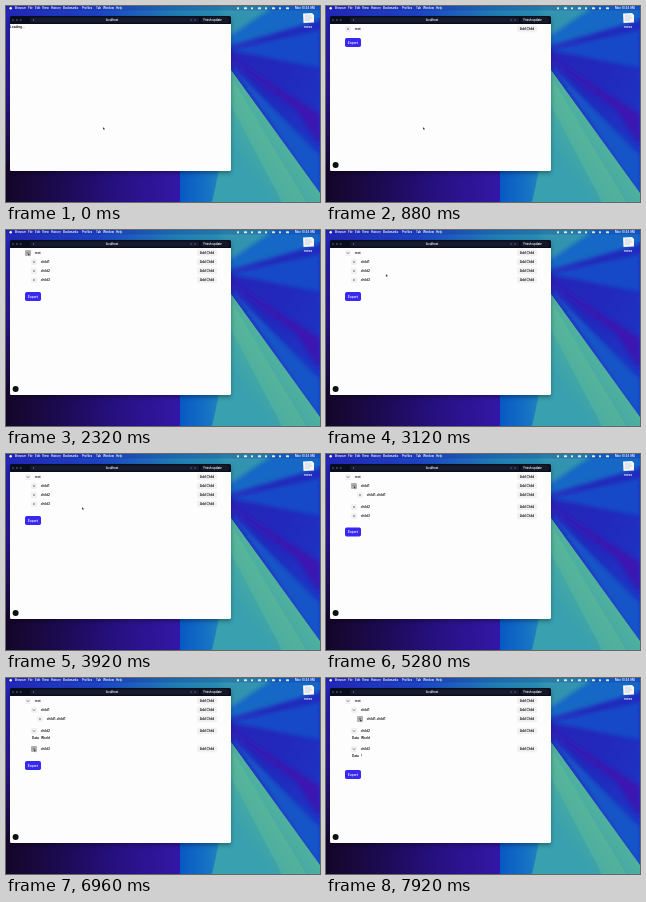
Recreate the animation shown at these times as an HTML page. Size 314 by 196 pixels, loop 8 s.

```html
<!DOCTYPE html>
<html lang="en">
<head>
<meta charset="utf-8">
<title>Tree editor</title>
<style>
  html, body { margin: 0; width: 100%; height: 100%; overflow: hidden; background: #1a1a8c; }
  svg { display: block; width: 100vw; height: 100vh; }
  text { font-family: Inter, Arial, sans-serif; font-size: 3.1px; font-weight: 600; fill: #080808; }
  .light text, text.light { fill: #fff; }
  .small { font-size: 2.8px; }
</style>
</head>
<body>
<svg viewBox="0 0 314 196" preserveAspectRatio="none">
  <defs>
    <linearGradient id="top" x2="1">
      <stop stop-color="#2326b8"/><stop offset=".3" stop-color="#1d45c4"/><stop offset=".55" stop-color="#207fb4"/>
      <stop offset=".76" stop-color="#3095b0"/><stop offset=".9" stop-color="#1468c4"/><stop offset="1" stop-color="#1450c8"/>
    </linearGradient>
    <linearGradient id="sky" x2="1" y2="1">
      <stop stop-color="#2f20b4"/><stop offset=".5" stop-color="#2228bc"/><stop offset="1" stop-color="#1a3cc8"/>
    </linearGradient>
    <linearGradient id="beam" gradientUnits="userSpaceOnUse" x1="222" y1="140" x2="275" y2="100">
      <stop stop-color="#38a0ae"/><stop offset=".6" stop-color="#4cae9f"/><stop offset="1" stop-color="#5cb896"/>
    </linearGradient>
    <linearGradient id="base" x2="1">
      <stop stop-color="#140628"/><stop offset=".3" stop-color="#1c0a50"/><stop offset=".62" stop-color="#271080"/><stop offset="1" stop-color="#3318a8"/>
    </linearGradient>
    <linearGradient id="foot" x2="1">
      <stop stop-color="#0858c4"/><stop offset=".5" stop-color="#1673c4"/><stop offset="1" stop-color="#309bb4"/>
    </linearGradient>
    <linearGradient id="side" x2="0" y2="1">
      <stop stop-color="#2326b8"/><stop offset=".5" stop-color="#2a1590"/><stop offset="1" stop-color="#140628"/>
    </linearGradient>
    <filter id="soft" x="-.2" y="-.2" width="1.4" height="1.4"><feGaussianBlur stdDeviation="2"/></filter>
  </defs>

  <g id="wallpaper">
    <path fill="url(#sky)" d="M200 0H314V196H200z"/>
    <path fill="url(#side)" d="M0 0H8V170H0z"/>
    <path fill="url(#top)" d="M0 0H314V12H0z"/>
    <g filter="url(#soft)">
      <path fill="#3094b0" d="M215 0H268L218 34z"/>
      <path fill="#1268c6" d="M268 0H314V14L218 42V34z"/>
      <path fill="#1648c8" d="M314 24V62L222 44z"/>
      <path fill="#3a18b0" d="M218 48L290 104L314 140V108z"/>
      <path fill="#1354c8" d="M222 56L314 150V188z"/>
    </g>
    <path fill="url(#base)" d="M0 160H176V196H0z"/>
    <path fill="url(#foot)" d="M174 160H230V196H174z"/>
    <path fill="url(#beam)" d="M220 57L314 187V196H206L214 160H220z"/>
    <path fill="#6cc090" opacity=".35" d="M220 62L300 196H276L220 90z"/>
  </g>

  <g class="light">
    <path fill="#101a80" opacity=".2" d="M0 0H314V4.5H0z"/>
    <circle cx="4.7" cy="2.3" r="1.2" fill="#fff"/>
    <g id="menu"></g>
    <g id="status"></g>
    <path fill="#f4f5f7" d="M297 7.500L306 7L308 9V16.500L297.500 17z"/>
    <path stroke="#aaa" stroke-width=".5" d="M299 10H305M299 12H306M299 14H304"/>
    <text x="302" y="21.700" text-anchor="middle">notes</text>
  </g>

  <rect x="4" y="12" width="221" height="155" rx="2" opacity=".35" filter="url(#soft)"/>
  <rect x="4" y="10" width="221" height="155" rx="1.5" fill="#080c1c"/>
  <path fill="#fdfdfd" d="M4 18H225V163.500Q225 165 223.500 165H5.500Q4 165 4 163.500z"/>
  <g class="light">
    <g fill="#41465a"><circle cx="7" cy="14" r="1"/><circle cx="10.800" cy="14" r="1"/><circle cx="14.600" cy="14" r="1"/></g>
    <rect x="24" y="11.500" width="169" height="5" rx="1.500" fill="#161a2e"/>
    <text class="small" x="106" y="14.800" text-anchor="middle">localhost</text>
    <path fill="none" stroke="#858999" stroke-width=".6" d="M28 13L27 14L28 15M184 14H186M188 14H190"/>
    <rect x="195" y="11" width="28" height="6" rx="2" fill="#141726"/>
    <text class="small" x="197.500" y="15">Finish update</text>
  </g>

  <text id="loading" x="4" y="21.600">Loading...</text>
  <g id="page">
    <g id="rows"></g>
    <g id="export">
      <rect x="19" width="16" height="9" rx="1.700" fill="#3928ef"/>
      <text class="light" x="27" y="5.600" text-anchor="middle">Export</text>
    </g>
    <circle cx="9.600" cy="159" r="3" fill="#101010"/>
  </g>
  <path id="cursor" fill="#111" stroke="#fff" stroke-width=".25" d="M0 0V2.800L.7 2.200L1.200 3.200L1.700 3L1.200 2H2.100z"/>
</svg>
<script>
const LOOP = 8000;
const $ = id => document.getElementById(id);

function el(parent, tag, attrs, text) {
  const node = document.createElementNS("http://www.w3.org/2000/svg", tag);
  for (const key in attrs) node.setAttribute(key, attrs[key]);
  if (text) node.textContent = text;
  parent.append(node);
  return node;
}

[[9, "Browser"], [22, "File"], [29, "Edit"], [36, "View"], [45, "History"], [57, "Bookmarks"],
 [76, "Profiles"], [90, "Tab"], [97, "Window"], [110, "Help"]].forEach(([x, s]) =>
  el($("menu"), "text", { x, y: 3.4, class: "small" }, s));
for (let i = 0; i < 8; i++)
  el($("status"), "rect", { x: 231 + i * 7, y: 1.3, width: 2 + i % 2, height: 2, rx: .6, fill: "#fff", opacity: .85 });
el($("status"), "text", { x: 289, y: 3.4, class: "small" }, "Mon 10:24 AM");

// Page layouts: times of clicks, row centres (0 = hidden), export position
const stages = [
  { at: 320, y: [23, 0, 0, 0, 0, 0, 0], out: 32 },
  { at: 2080, y: [23, 32, 0, 41, 0, 50, 0], out: 62 },
  { at: 4960, y: [23, 32, 41, 53, 0, 62, 0], out: 73.5 },
  { at: 6240, y: [23, 32, 41, 53, 60, 71, 0], out: 83 },
  { at: 7040, y: [23, 32, 41, 53, 60, 71, 78], out: 92 }
];

function addRow([label, depth, opens, data]) {
  const g = el($("rows"), "g");
  if (data) {
    el(g, "text", { x: 26, y: 1 }, "Data");
    el(g, "text", { x: 35, y: 1 }, data);
    return { g };
  }
  const x = 22 + depth * 6;
  const button = el(g, "rect", { x: x - 3, y: -3, width: 6, height: 6, rx: 1 });
  const arrow = el(g, "path", { fill: "none", stroke: "#111", "stroke-width": .6 });
  el(g, "text", { x: x + 6.7, y: 1.1 }, label);
  el(g, "rect", { x: 191, y: -3.2, width: 20, height: 6.4, rx: 1.2, fill: "#f1f1f3" });
  el(g, "text", { x: 201, y: 1.1, "text-anchor": "middle" }, "Add Child");
  return { g, x, button, arrow, opens };
}

const rows = [
  ["root", 0, 2080], ["child1", 1, 4960], ["child1-child1", 2, 9999],
  ["child2", 1, 6240], ["", 0, 0, "World"], ["child3", 1, 7040], ["", 0, 0, "!"]
].map(addRow);

// Pointer stops: time, x, y
const path = [
  [0, 97, 121], [880, 97, 121], [1440, 44, 45], [1920, 22, 23], [2560, 22, 23],
  [3440, 76, 53], [4080, 76, 53], [4720, 28, 32], [5360, 28, 32], [5920, 28, 53],
  [6320, 28, 53], [6880, 28, 71], [7200, 28, 71], [7760, 34, 41], [8000, 34, 41]
];

function pointer(t) {
  const i = path.findIndex(p => p[0] > t);
  const [a, b] = [path[i - 1], path[i]];
  const u = (t - a[0]) / (b[0] - a[0]);
  const k = u * u * (3 - 2 * u);
  return [a[1] + (b[1] - a[1]) * k, a[2] + (b[2] - a[2]) * k];
}

function show(node, on) { node.style.display = on ? "" : "none"; }

function draw(t) {
  const stage = stages.filter(s => s.at <= t).pop();
  const [px, py] = pointer(t);
  show($("loading"), !stage);
  show($("page"), stage);
  $("cursor").setAttribute("transform", `translate(${px} ${py})`);
  if (!stage) return;
  $("export").setAttribute("transform", `translate(0 ${stage.out})`);
  rows.forEach((r, i) => {
    const y = stage.y[i];
    show(r.g, y);
    r.g.setAttribute("transform", `translate(0 ${y})`);
    if (!r.button) return;
    const hover = Math.abs(px - r.x) < 3 && Math.abs(py - y) < 3;
    r.button.setAttribute("fill", hover ? "#b0b0b3" : "#f1f1f3");
    r.arrow.setAttribute("d", t >= r.opens ? `M${r.x - 1} -.5l1 1 1 -1` : `M${r.x - .5} -1l1 1 -1 1`);
  });
}

function tick() {
  draw(performance.now() % LOOP);
  requestAnimationFrame(tick);
}
tick();
</script>
</body>
</html>
```
